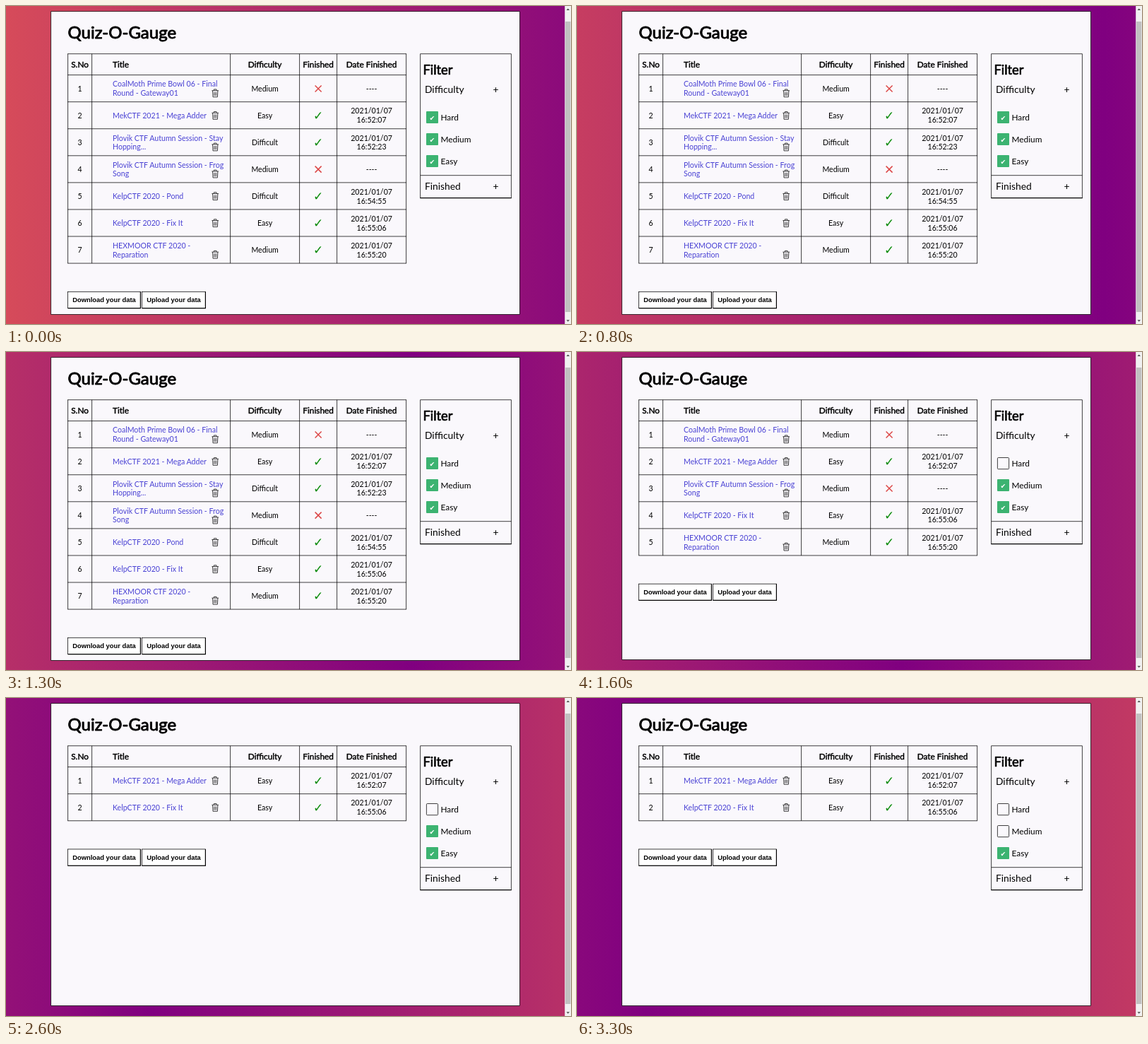
An HTML page for the animation above (3400 ms loop, 800 by 450 pixels).

```html
<!DOCTYPE html>
<html lang="en">
<head>
<meta charset="utf-8">
<title>Challenge tracker</title>
<style>
  html, body { margin: 0; width: 100%; height: 100%; overflow: hidden; }
  svg { display: block; width: 800px; height: 450px; font-family: Lato, sans-serif; }
  .line { fill: none; stroke: #000; stroke-width: .75; }
  .heavy { stroke: #000; stroke-linejoin: round; }
  .mid { text-anchor: middle; }
  .cell { font-size: 10.6px; }
  .link { fill: #4a42d4; }
  .mark { font-family: "DejaVu Sans", sans-serif; text-anchor: middle; }
  .button { font: bold 9.37px "Liberation Sans", Arial, sans-serif; text-anchor: middle; }
</style>
</head>
<body>
<svg viewBox="0 0 800 450">
  <defs>
    <linearGradient id="sweep" gradientUnits="userSpaceOnUse" y1="0" y2="0">
      <stop offset="0" stop-color="rgb(214,75,90)"/>
      <stop offset=".5" stop-color="rgb(128,0,128)"/>
      <stop offset="1" stop-color="rgb(214,75,90)"/>
    </linearGradient>
    <g id="bin" fill="none" stroke="#222" stroke-width=".85">
      <path d="M-4.8 -3.6H4.8M-1.8 -3.6V-5.4H1.8V-3.6M-3.7 -3.6L-3.2 5.4H3.2L3.7 -3.6"/>
      <path d="M-1.6 -1.5V3.7M0 -1.5V3.7M1.6 -1.5V3.7" stroke-width=".7"/>
    </g>
  </defs>
  <rect width="800" height="450" fill="url(#sweep)"/>
  <g id="scrollbar">
    <rect x="791.2" width="8.8" height="450" fill="#f1f1f1"/>
    <rect x="792" y="22" width="7.4" height="411" fill="#c1c1c1"/>
    <path d="M793.5 6L795.7 3.4L798 6ZM793.5 444.2L795.7 446.8L798 444.2Z" fill="#505050"/>
  </g>
  <g id="page"></g>
</svg>
<script>
const LOOP = 3400, STEP = 100;
const HARD_OFF = 1500, MEDIUM_OFF = 2600, BOX_DELAY = 100;
const SPREAD = 912;
const columns = [87.6, 121.6, 317.6, 415.6, 468.6, 566.6];
const TABLE_TOP = 67.7, HEAD_BOTTOM = 97.6, ROW = 38.07;

// Time and x position of the purple centre of the background
const sweepKeys = [[0, 912], [800, 745], [1200, 615], [1600, 460],
                   [2200, 340], [2600, 205], [3300, 98]];

const entries = [
  { title: ['CoalMoth Prime Bowl 06 - Final', 'Round - Gateway01'], level: 'Medium' },
  { title: ['MekCTF 2021 - Mega Adder'], level: 'Easy', time: '16:52:07' },
  { title: ['Plovik CTF Autumn Session - Stay', 'Hopping...'], level: 'Difficult', time: '16:52:23' },
  { title: ['Plovik CTF Autumn Session - Frog', 'Song'], level: 'Medium' },
  { title: ['KelpCTF 2020 - Pond'], level: 'Difficult', time: '16:54:55' },
  { title: ['KelpCTF 2020 - Fix It'], level: 'Easy', time: '16:55:06' },
  { title: ['HEXMOOR CTF 2020 -', 'Reparation'], level: 'Medium', time: '16:55:20' }
];

const page = document.getElementById('page');
const sweep = document.getElementById('sweep');

const text = (x, y, value, cls = '', attrs = '') =>
  `<text x="${x}" y="${y}" class="${cls}" ${attrs}>${value}</text>`;
const heavy = (x, y, value, size, cls = '') =>
  text(x, y, value, 'heavy ' + cls, `font-size="${size}" stroke-width="${size / 27}"`);
const path = (d, style = '') => `<path class="line" d="${d}" style="${style}"/>`;
const center = i => (columns[i] + columns[i + 1]) / 2;

// One or two lines of text centred on y
const lines = (x, y, values, cls) => values.map((value, i) =>
  text(x, y + 4.2 + (i - (values.length - 1) / 2) * 12.9, value, 'cell ' + cls)).join('');

function tableRow(entry, i) {
  const y = HEAD_BOTTOM + ROW * (i + .5);
  const binY = entry.title.length > 1 ? y + 6.5 : y;
  return lines(center(0), y, [i + 1], 'mid')
    + lines(151, y, entry.title, 'link')
    + `<use href="#bin" x="296.2" y="${binY + .2}"/>`
    + lines(center(2), y, [entry.level], 'mid')
    + (entry.time
      ? text(442, y + 6.2, '✓', 'mark', 'font-size="17" fill="#078a07"')
      : path(`M437.6 ${y - 4.2}l9 9m0 -9l-9 9`, 'stroke:#dc4848;stroke-width:1.5'))
    + lines(center(4), y, entry.time ? ['2021/01/07', entry.time] : ['----'], 'mid');
}

function table(rows) {
  const bottom = HEAD_BOTTOM + ROW * rows.length;
  let d = columns.map(x => `M${x} ${TABLE_TOP}V${bottom}`).join('') + `M87.2 ${TABLE_TOP}H567`;
  for (let i = 0; i <= rows.length; i++) d += `M87.2 ${HEAD_BOTTOM + ROW * i}H567`;
  return path(d)
    + heavy(center(0), 87.2, 'S.No', 11.85, 'mid')
    + heavy(151, 87.2, 'Title', 11.85)
    + ['Difficulty', 'Finished', 'Date Finished']
      .map((name, i) => heavy(center(i + 2), 87.2, name, 11.85, 'mid')).join('')
    + rows.map(tableRow).join('');
}

function button(x, y, width, label) {
  return `<rect x="${x}" y="${y}" width="${width}" height="23.3" class="line" style="fill:#fff"/>`
    + path(`M${x} ${y + 23.3}H${x + width}V${y}`, 'stroke-width:1.2')
    + text(x + width / 2, y + 15, label, 'button');
}

function checkbox(y, label, checked) {
  const box = checked
    ? `<rect x="595" y="${y - 8.5}" width="17" height="17" rx="1" fill="#3cb371"/>`
      + text(603.5, y + 4, '✔', 'mark', 'font-size="9.4" fill="#fff"')
    : `<rect x="595.4" y="${y - 8.1}" width="16.2" height="16.2" rx="1.2" class="line"/>`;
  return box + text(615.5, y + 4.7, label, '', 'font-size="11.85"');
}

function sidebar(hard, medium) {
  const section = (y, name) => text(593, y, name, '', 'font-size="13.8"')
    + text(693.5, y, '+', 'mid', 'font-size="13.8"');
  return path('M586.6 271.6V67.7H715.4V271.6M586.6 239.7H715.4')
    + path('M586.2 271.6H715.8', 'stroke-width:1.3')
    + heavy(590.5, 97.4, 'Filter', 18.3)
    + section(123, 'Difficulty') + section(259.5, 'Finished')
    + checkbox(157.6, 'Hard', hard)
    + checkbox(188.6, 'Medium', medium)
    + checkbox(219.6, 'Easy', true);
}

function renderPage(t) {
  const rows = entries.filter(({ level }) =>
    !(level === 'Difficult' && t >= HARD_OFF) && !(level === 'Medium' && t >= MEDIUM_OFF));
  const cardHeight = t < HARD_OFF ? 428.8 : 427.8;
  const buttonY = HEAD_BOTTOM + ROW * rows.length + 40.2;
  page.innerHTML = `<rect x="63.7" y="7.7" width="663.8" height="${cardHeight}" class="line" style="fill:#faf8fc"/>`
    + heavy(87.5, 46.2, 'Quiz-O-Gauge', 24)
    + table(rows)
    + button(87.6, buttonY, 102.8, 'Download your data')
    + button(192.6, buttonY, 89.8, 'Upload your data')
    + sidebar(t < HARD_OFF + BOX_DELAY, t < MEDIUM_OFF + BOX_DELAY);
}

function sweepCenter(t) {
  const i = Math.max(1, sweepKeys.findIndex(([time]) => time >= t));
  const [t0, x0] = sweepKeys[i - 1], [t1, x1] = sweepKeys[i];
  return x0 + (x1 - x0) * (t - t0) / (t1 - t0);
}

let shown = -1;
function draw(now) {
  const t = Math.floor((now % LOOP) / STEP) * STEP;
  if (t !== shown) {
    const x = sweepCenter(t);
    sweep.setAttribute('x1', x - SPREAD);
    sweep.setAttribute('x2', x + SPREAD);
    renderPage(t);
    shown = t;
  }
}

const start = performance.now();
function tick() {
  draw(performance.now() - start);
  requestAnimationFrame(tick);
}
tick();
</script>
</body>
</html>
```
